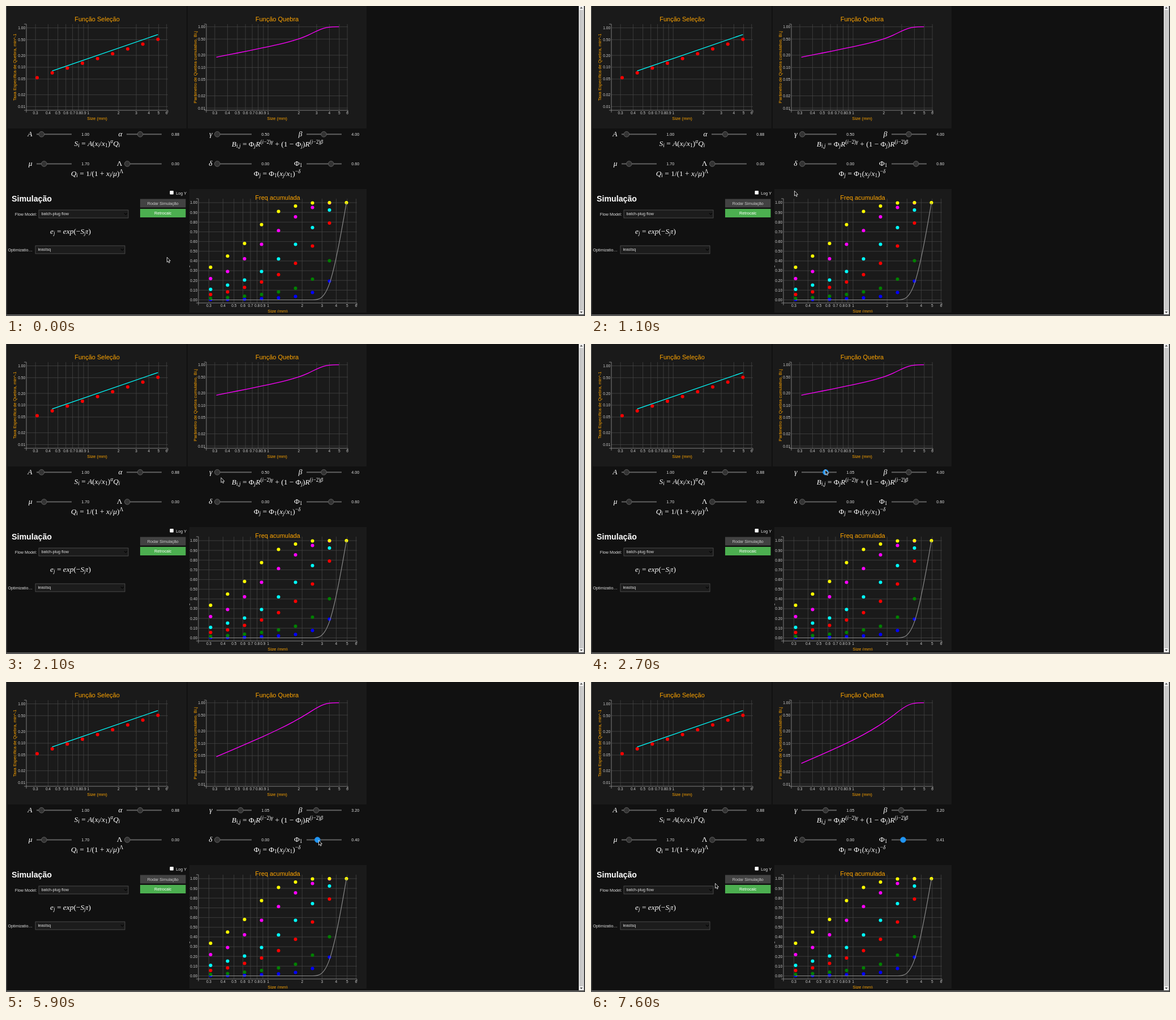
Write an HTML page that moves like this. It is 1023 by 547 pixels and loops after 8 s.

```html
<!DOCTYPE html>
<html lang="pt">
<head>
<meta charset="utf-8">
<style>
html, body { margin: 0; width: 100%; height: 100%; overflow: hidden; background: #111; }
svg { display: block; font-family: "Liberation Sans", Arial, sans-serif; }
.math { font: 13.4px "Liberation Serif", "Times New Roman", serif; fill: #fff; }
.math .i { font-style: italic; }
</style>
</head>
<body>
<svg id="stage" width="1023" height="547" viewBox="0 0 1023 547"></svg>
<script>
const ORANGE = '#ffa500';
const rect = (x, y, w, h, fill, extra = '') =>
  `<rect x="${x}" y="${y}" width="${w}" height="${h}" fill="${fill}" ${extra}/>`;
const path = (d, stroke, width = 1, extra = '') =>
  `<path d="${d}" fill="none" stroke="${stroke}" stroke-width="${width}" ${extra}/>`;
const dot = (x, y, fill, r = 3) => `<circle cx="${x}" cy="${y}" r="${r}" fill="${fill}"/>`;
const text = (x, y, s, size = 7.2, fill = '#e0e0e0', anchor = 'start', extra = '') =>
  `<text x="${x}" y="${y}" font-size="${size}" fill="${fill}" text-anchor="${anchor}" ${extra}>${s}</text>`;

// Tiny math markup: _sub_ and ^sup^, lower case Greek and Latin letters in italics
function math(x, y, s, anchor = 'middle') {
  const italic = p => p.replace(/[A-Za-zα-ω]+/g, '<tspan class="i">$&</tspan>');
  const body = s.split(/([_^].*?[_^])/).map(p =>
    /^[_^]/.test(p)
      ? `<tspan font-size="9.4" baseline-shift="${p[0] == '_' ? -2.2 : 4.6}">${italic(p.slice(1, -1))}</tspan>`
      : italic(p)).join('');
  return `<text class="math" x="${x}" y="${y}" text-anchor="${anchor}">${body}</text>`;
}

// Uniform B-spline that reaches both end points
function spline(pts) {
  const p = [pts[0], ...pts, pts.at(-1), pts.at(-1)];
  const mix = (a, b, c, u, v, w) => [0, 1].map(k => ((a[k] * u + b[k] * v + c[k] * w) / (u + v + w)).toFixed(2));
  let d = 'M' + pts[0];
  for (let i = 1; i < p.length - 1; i++) {
    const [a, b, c] = [p[i - 1], p[i], p[i + 1]];
    d += i == 1 ? 'L' + mix(a, b, c, 1, 4, 1)
      : `C${mix(a, b, c, 2, 1, 0)} ${mix(a, b, c, 1, 2, 0)} ${mix(a, b, c, 1, 4, 1)}`;
  }
  return d + 'L' + pts.at(-1);
}

const SIZES = [.3, .4, .5, .6, .7, .8, .9, 1, 2, 3, 4, 5, 6];
const LEVELS = [1, .5, .2, .1, .05, .02, .01];

function plot({ panel, box, x1, decade, title, titleY, yTicks, yLabel, yLabelX }) {
  const [l, t, r, b] = box, mid = (l + r) / 2, midY = (t + b) / 2;
  const xs = SIZES.map(v => [x1 + decade * Math.log10(v), v]);
  let grid = '', labels = '';
  for (const [x, v] of xs) {
    grid += `M${x.toFixed(1)} ${t}V${b}`;
    labels += text(x.toFixed(1), b + 6.8, v, 6.5, '#ccc', 'middle');
  }
  for (const [y, v] of yTicks) {
    grid += `M${l} ${y.toFixed(1)}H${r}`;
    labels += text(l - 1.8, (y + 2.4).toFixed(1), v.toFixed(2), 6.6, '#ccc', 'end');
  }
  return rect(...panel, '#1a1a1a') + path(grid, '#444', .8) +
    path(`M${l - 4} ${t}H${l}V${b}H${l - 4}M${l} ${b + 4}V${b}H${r}V${b + 4}`, '#999', .8) + labels +
    text(mid, titleY, title, 11, ORANGE, 'middle') +
    text(mid, b + 16.5, 'Size (mm)', 7.8, ORANGE, 'middle') +
    (yLabel ? text(0, 0, yLabel, 7.65, ORANGE, 'middle', `transform="translate(${yLabelX} ${midY}) rotate(-90)"`) : '');
}

const logTicks = (top, decade) => LEVELS.map(v => [top - decade * Math.log10(v), v]);
const select = (x, y, s) => rect(x + .5, y + .5, 158, 14, '#1c1c1c', 'stroke="#555" stroke-width=".8"') +
  text(x + 5, y + 9.8, s) + path(`M${x + 151.5} ${y + 6}l2.5 2.5l2.5-2.5`, '#050505', 1.2);
const button = (y, s, fill, color) => rect(237, y, 80.5, 15, fill) + text(277.3, y + 10, s, 7.2, color, 'middle');

function selectionPlot() {
  let s = plot({
    panel: [3, 0, 316, 216], box: [36, 32, 286, 184], x1: 145.2, decade: 178,
    title: 'Função Seleção', titleY: 26.7, yTicks: logTicks(38.5, 69.5),
    yLabel: 'Taxa Específica de Quebra, min^-1', yLabelX: 18.2
  }) + path('M81.5 114.7L268.5 50.3', '#0ff', 1.3);
  for (let i = 0; i < 9; i++) s += dot(55 + 26.68 * i, 126.5 - 8.46 * i, 'red');
  return s;
}

// Marker heights per series, from the finest size to the coarsest
const SERIES = {
  blue: [518, 518, 517.5, 516.5, 515, 512.5, 505.5, 485.5],
  green: [516, 514.5, 512, 509, 504.5, 498, 482, 449.5],
  red: [509, 504.5, 496.5, 487, 474, 454, 423.5, 383],
  cyan: [500, 492.5, 483.5, 468.5, 446.3, 420.5, 391, 360],
  magenta: [481, 468.5, 446, 420.5, 396.3, 372, 355.5, 347.5],
  yellow: [461, 441.3, 419, 385.8, 362.6, 353, 347.4, 347, 347]
};

function frequencyPlot() {
  const x = i => 361.5 + 30 * i;
  const ticks = Array.from({ length: 11 }, (_, i) => [518.5 - 17.15 * i, i / 10]);
  const feed = Array.from({ length: 9 }, (_, i) => [x(i), i < 8 ? 518.5 : 347]);
  let s = plot({
    panel: [324, 323, 313, 218], box: [340, 340, 620, 524], x1: 463, decade: 200,
    title: 'Freq acumulada', titleY: 342.3, yTicks: ticks
  });
  for (const color in SERIES) s += SERIES[color].map((y, i) => dot(x(i), y, color)).join('');
  return s + path(spline(feed), '#888', 1.2) + rect(324, 458, 1, 3, '#888') + rect(324, 541, 313, 3, '#111');
}

// name: [track x, y, min, max, start value]
const SLIDERS = {
  'A': [54, 226.3, 0, 8, 1], 'α': [213, 226.3, .5, 1.5, .88],
  'γ': [372, 226.3, .5, 1.3, .5], 'β': [531, 226.3, 2.25, 5.85, 4],
  'μ': [54, 278.5, 0, 8.5, 1.7], 'Λ': [213, 278.5, 0, 1, 0],
  'δ': [372, 278.5, 0, 1, 0], 'Φ': [531, 278.5, .25, .75, .6]
};

function slider(name, value, active) {
  const [x, y, min, max] = SLIDERS[name];
  const knob = x + 1.3 + 60 * (value - min) / (max - min);
  return rect(x, y - 1, 62, 2, '#616161') +
    `<circle cx="${knob}" cy="${y}" r="4.8" fill="${active ? '#2196f3' : '#333'}" stroke="${active ? '#1e88e5' : '#666'}" stroke-width=".9"/>` +
    text(x + 79.3, y + 2.8, value.toFixed(2));
}

function breakageCurve(phi, gamma, beta) {
  return spline(Array.from({ length: 9 }, (_, i) => {
    const r = Math.SQRT1_2 ** Math.max(0, 7 - i);
    const b = phi * r ** gamma + (1 - phi) * r ** beta;
    return [371.6 + 27.08 * i, 36.7 - 71.7 * Math.log10(b)];
  }));
}

function backdrop() {
  let s = rect(0, 0, 1023, 547, '#111') + selectionPlot() + plot({
    panel: [321, 0, 316, 216], box: [354, 32, 604, 184], x1: 463, decade: 180,
    title: 'Função Quebra', titleY: 26.7, yTicks: logTicks(36.7, 71.7),
    yLabel: 'Parâmetro de Quebra cumulativo, Bi,j', yLabelX: 336.5
  }) + frequencyPlot();
  for (const name in SLIDERS) {
    const [x, y] = SLIDERS[name];
    s += math(x - 7.5, y + 3.5, name == 'Φ' ? 'Φ_1_' : name, 'end');
  }
  s += math(161, 246.8, 'S_i_ = A(x_i_/x_1_)^α^Q_i_') +
    math(479.5, 248, 'B_i,j_ = Φ_j_R^(i−2)γ^ + (1 − Φ_j_)R^(i−2)β^') +
    math(161, 300.3, 'Q_i_ = 1/(1 + x_i_/μ)^Λ^') +
    math(479, 300.3, 'Φ_j_ = Φ_1_(x_j_/x_1_)^−δ^') +
    math(114, 402, 'e_j_ = exp(−S_j_τ)');
  s += text(10, 345, 'Simulação', 14.2, '#fff', 'start', 'font-weight="bold"') +
    text(54.5, 369.8, 'Flow Model:', 7.2, '#e0e0e0', 'end') + select(57.5, 359.5, 'batch-plug flow') +
    text(3.5, 432.8, 'Optimizatio…') + select(51.5, 422.5, 'leastsq') +
    rect(289.5, 326, 6.5, 6.5, '#fff', 'rx="1"') + text(300.3, 333, 'Log Y') +
    button(340.5, 'Rodar Simulação', '#424242', '#ccc') + button(358, 'Retrocalc', '#4caf50', '#fff');
  // window frame and scroll bar
  return s + rect(0, 0, 1.5, 547, '#4a4a4a') + rect(0, 544, 1023, 3, '#555') +
    rect(1021, 0, 2, 547, '#444') + rect(1012, 0, 9, 544, '#f1f1f1') + rect(1013, 7, 7, 530, '#c8c8c8') +
    '<path d="M1014 4.5l2.5-3l2.5 3zM1014 539l2.5 3l2.5-3z" fill="#505050"/>';
}

// [time, pointer x, pointer y, changed state]
const STEPS = [
  [0, 284, 443, { active: '', 'γ': .5, 'β': 4, 'Φ': .6, curve: [.6, .5, 4] }],
  [400, 285, 437], [700, 290, 431], [800, 304, 410], [900, 322, 383], [1000, 341, 354],
  [1100, 359, 326], [1200, 367, 308], [1300, 371, 296], [1400, 373, 287], [1500, 372, 281],
  [1600, 370, 274], [1700, 369, 278], [1900, 373, 265], [2000, 377, 249], [2100, 379.5, 235.5],
  [2200, 377, 227], [2300, 373, 222],
  [2500, 373, 222, { active: 'γ' }],
  [2600, 394, 222, { 'γ': .78 }],
  [2700, 413.3, 221.5, { 'γ': 1.05 }],
  [5100, 569.5, 282, { active: 'β', 'β': 3.2, curve: [.6, 1.05, 3.2] }],
  [5500, 573, 276, { active: 'Φ' }],
  [5900, 552, 279, { 'Φ': .4 }],
  [6400, 552, 279, { curve: [.54, 1.05, 3.2] }],
  [6800, 552, 279, { 'Φ': .41, curve: [.41, 1.05, 3.2] }],
  [7200, 223, 341], [7600, 219, 355]
];

const stage = document.getElementById('stage');
stage.innerHTML = backdrop() + '<g id="live"></g>';
const live = document.getElementById('live');
let shown = -1;

function draw() {
  const t = performance.now() % 8000;
  const now = STEPS.findLastIndex(s => s[0] <= t);
  if (now != shown) {
    shown = now;
    const state = Object.assign({}, ...STEPS.slice(0, now + 1).map(s => s[3]));
    const [, x, y] = STEPS[now];
    live.innerHTML = path(breakageCurve(...state.curve), 'magenta', 1.3) +
      Object.keys(SLIDERS).map(n => slider(n, state[n] ?? SLIDERS[n][4], state.active == n)).join('') +
      `<path transform="translate(${x} ${y})" d="M.5 .3V9L2.4 7.2L3.8 10.2L5.2 9.6L3.9 6.7H6.5Z" fill="#000" stroke="#fff" stroke-width=".8"/>`;
  }
  requestAnimationFrame(draw);
}
draw();
</script>
</body>
</html>
```
